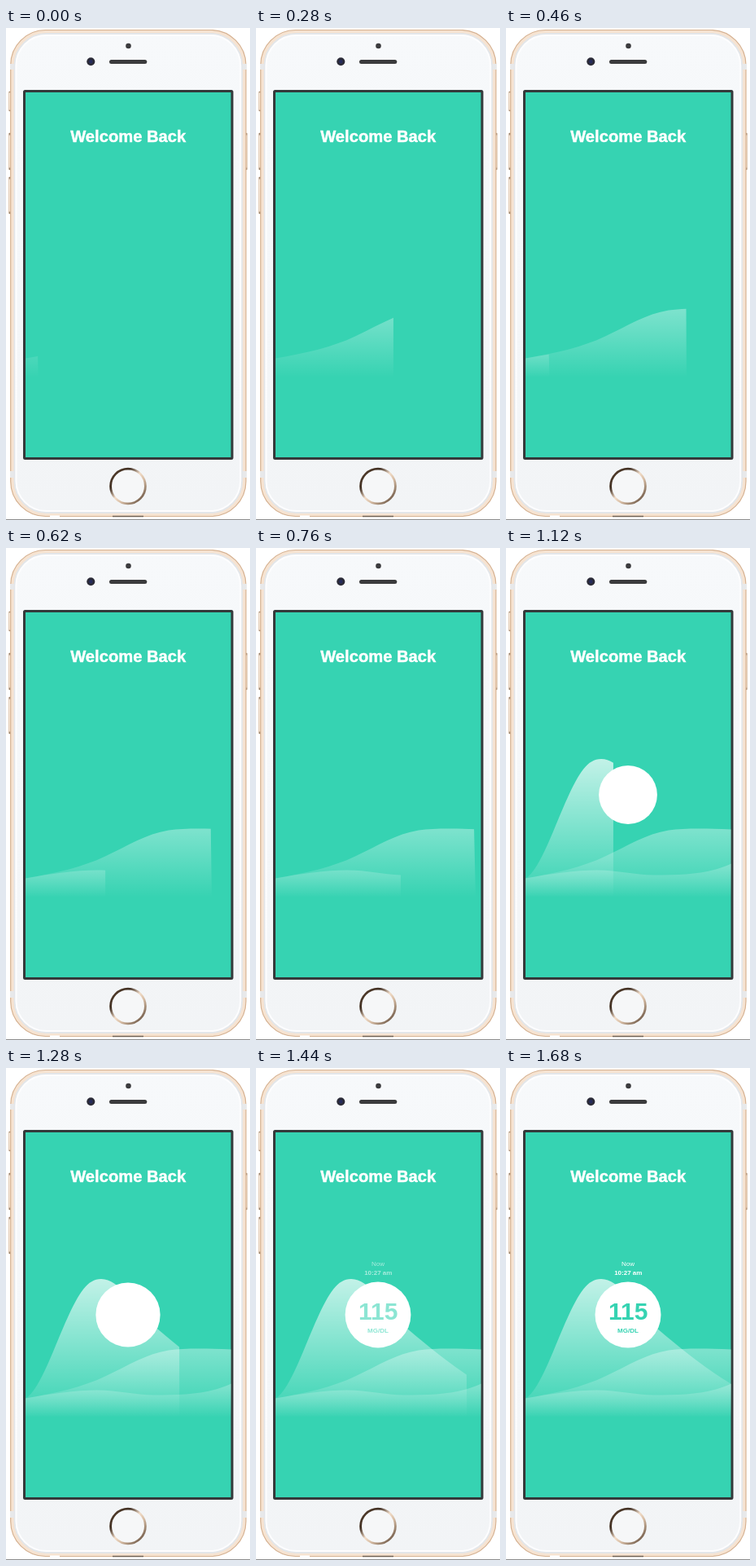
Recreate the animation shown at these times as an HTML page. Size 300 px wide and 604 px high, loop 1.7 s.

```html
<!DOCTYPE html>
<html lang="en">
<head>
<meta charset="utf-8">
<title>Welcome Back</title>
<style>
  html, body { margin: 0; width: 100%; height: 100%; overflow: hidden; background: #fff; }
  svg { display: block; width: 300px; height: 604px; }
  text { font-family: "Liberation Sans", Arial, sans-serif; text-anchor: middle; }
  .bold { font-weight: bold; }
</style>
</head>
<body>
<svg viewBox="0 0 300 604">
  <defs>
    <linearGradient id="body" x2="0" y2="1">
      <stop stop-color="#f7f9fb"/><stop offset="1" stop-color="#f2f4f6"/>
    </linearGradient>
    <linearGradient id="key" x2="0" y2="1">
      <stop stop-color="#5f4b39"/><stop offset=".08" stop-color="#fbf1e6"/>
      <stop offset=".92" stop-color="#f6e6d5"/><stop offset="1" stop-color="#5f4b39"/>
    </linearGradient>
    <linearGradient id="ring" x2="1" y2="1">
      <stop stop-color="#5b4330"/><stop offset=".28" stop-color="#3f2e21"/>
      <stop offset=".48" stop-color="#f1dcc8"/><stop offset=".62" stop-color="#d9bfa6"/>
      <stop offset="1" stop-color="#4d3828"/>
    </linearGradient>
  </defs>

  <rect width="300" height="604" fill="#fff"/>
  <g fill="url(#key)" stroke="#cfae8e" stroke-width=".6">
    <rect x="3.5" y="78" width="3" height="24" rx="1"/>
    <rect x="3.5" y="129" width="3" height="45" rx="1"/>
    <rect x="3.5" y="183" width="3" height="45" rx="1"/>
    <rect x="293.5" y="129" width="3" height="45" rx="1"/>
  </g>
  <rect x="5.7" y="2.5" width="289.3" height="597" rx="43" fill="#f6e3d1" stroke="#d6b292" stroke-width="1.2"/>
  <g fill="#e8e9ea">
    <rect x="5" y="44" width="6" height="7"/><rect x="290" y="44" width="6" height="7"/>
    <rect x="5" y="544" width="6" height="8"/><rect x="290" y="544" width="6" height="8"/>
  </g>
  <rect x="10.5" y="7" width="279.7" height="588" rx="39" fill="url(#body)" stroke="#e3e6e9" stroke-width="2"/>
  <rect x="12.5" y="9" width="275.7" height="584" rx="37" fill="none" stroke="#fdfdfe" stroke-width="2"/>
  <path d="M131 599.5H169" stroke="#6f5f50" stroke-width="1.6"/>
  <path d="M54 599.5H66" stroke="#fff" stroke-width="2"/>
  <path d="M0 603.5H300" stroke="#8d8d8d"/>

  <circle cx="150.5" cy="22" r="3.3" fill="#3b3b3d"/>
  <circle cx="104.3" cy="41.2" r="5" fill="#2b2b38"/>
  <circle cx="104.3" cy="41.2" r="2.2" fill="#252b5c"/>
  <rect x="127" y="39" width="46.3" height="5" rx="2.5" fill="#3b3b3d"/>
  <circle cx="150" cy="562.5" r="21.4" fill="#f6f7f8" stroke="url(#ring)" stroke-width="2.8"/>

  <rect x="22.5" y="77.5" width="255.5" height="451" rx="1" fill="#36d3b2" stroke="#34393a" stroke-width="3"/>
  <text class="bold" x="150.2" y="140.2" font-size="20.2" fill="#fff" stroke="#fff" stroke-width=".45">Welcome Back</text>

  <g id="waves"></g>
  <circle id="dot" cx="150" cy="303" fill="#fff"/>
  <g id="reading" font-size="8" fill="#fff">
    <text x="150" y="243">Now</text>
    <text class="bold" x="150.3" y="254">10:27 am</text>
    <g class="bold" fill="#36d3b2">
      <text x="150.3" y="309" font-size="30">115</text>
      <text x="150" y="325">MG/DL</text>
    </g>
  </g>
</svg>
<script>
const LOOP = 1700, STEP = 20, LEFT = 24, RIGHT = 276.8, BASE = 429;
const clamp = v => Math.min(1, Math.max(0, v));
const easeCubic = x => 1 - (1 - x) ** 3;
const easeSine = x => Math.sin(x * Math.PI / 2);
const easeSnap = x => 1 - (1 - Math.sqrt(x)) ** 3.5;
const progress = (t, start, length, ease) => ease(clamp((t - start) / length));
const byId = id => document.getElementById(id);

const waves = [
  { top: 344, alpha: .36, start: -23, length: 1260, span: 258, ease: easeCubic,
    curve: 'C60 399.5 95 391.5 122 378.5 C150 365.5 172 351 200 346.5 C222 343.5 250 344.5 277 345.5' },
  { top: 388, alpha: .25, start: 397, length: 960, span: 275, ease: easeSine,
    curve: 'C55 400 85 395.5 112 395.5 C138 395.5 158 401.5 182 401.5 C220 401.5 250 400 277 387.5' },
  { top: 259, alpha: .7, start: 981, length: 841, span: 258, ease: easeCubic,
    curve: 'C42 396 60 340 76 306 C90 276 100 259 117 259 C140 259 155 292 180 315 C205 336 240 366 277 388' }
];

byId('waves').innerHTML = waves.map((w, i) => `
  <linearGradient id="fade${i}" gradientUnits="userSpaceOnUse" x1="0" x2="0" y1="${w.top}" y2="${BASE}">
    <stop stop-color="#fff" stop-opacity="${w.alpha}"/><stop offset="1" stop-color="#fff" stop-opacity="0"/>
  </linearGradient>
  <clipPath id="clip${i}"><polygon id="edge${i}"/></clipPath>
  <path d="M24 405.5 ${w.curve} V${BASE} H24Z" fill="url(#fade${i})" clip-path="url(#clip${i})"/>`).join('');

// The revealing edge leans slightly near both ends of its travel.
function reveal(w, i, t) {
  const x = Math.min(RIGHT, LEFT + w.span * progress(t, w.start, w.length, w.ease));
  const along = (x - LEFT) / (RIGHT - LEFT);
  const lean = x > LEFT ? 2.5 * Math.abs(2 * along - 1) ** 3 : 0;
  const foot = Math.min(RIGHT, x + lean);
  byId('edge' + i).setAttribute('points',
    `${LEFT},${w.top - 3} ${x},${w.top - 3} ${foot},${BASE} ${LEFT},${BASE}`);
}

function draw(t) {
  waves.forEach((w, i) => reveal(w, i, t));
  byId('dot').setAttribute('r', 40.5 * progress(t, 970, 700, easeSnap));
  byId('reading').setAttribute('opacity', progress(t, 1340, 260, easeSine));
}

function tick() {
  const t = performance.now() % LOOP;
  draw(Math.floor(t / STEP) * STEP);
  requestAnimationFrame(tick);
}
tick();
</script>
</body>
</html>
```
